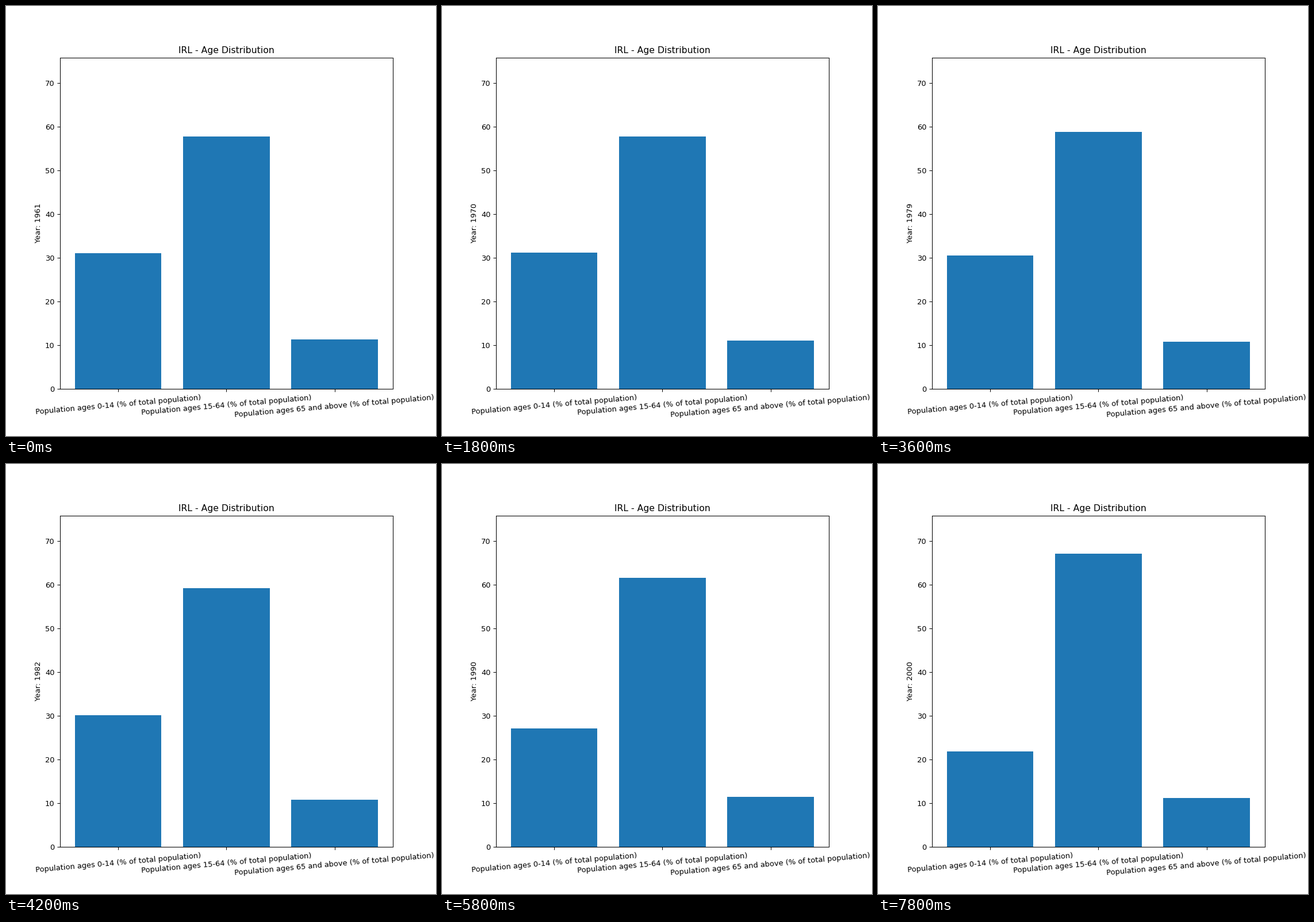
Recreate the animation shown at these times as a matplotlib script. Size 748 px wide and 748 px high, loop 8000 ms.

```python
import numpy as np
import matplotlib.pyplot as plt
from matplotlib.animation import FuncAnimation

SIZE, INCHES = 748, 8
FIRST, LAST = 1961, 2000
STEP_MS = 200
GROUPS = ["0-14", "15-64", "65 and above"]

# Turning points: year, share aged 15-64, share aged 65 and above
KEYS = [
    (1961, 57.76, 11.27),
    (1964, 58.00, 11.22),
    (1970, 57.76, 11.05),
    (1975, 58.20, 10.71),
    (1982, 59.16, 10.71),
    (1990, 61.53, 11.42),
    (1995, 64.34, 11.43),
    (2000, 67.06, 11.16),
]


def shares(year):
    """Shares drift evenly between turning points and add up to 100."""
    at, *columns = zip(*KEYS)
    working, older = (np.interp(year, at, c) for c in columns)
    return 100 - working - older, working, older


fig, ax = plt.subplots(figsize=(INCHES, INCHES), dpi=SIZE / INCHES)
labels = [f"Population ages {g} (% of total population)" for g in GROUPS]
bars = ax.bar(labels, shares(FIRST), color="#1f77b4")
ax.set_ylim(0, 75.8)
ax.set_title("IRL - Age Distribution")
ax.tick_params(axis="x", rotation=5)


def draw(i):
    year = FIRST + i
    for bar, share in zip(bars, shares(year)):
        bar.set_height(share)
    ax.set_ylabel(f"Year: {year}")
    return list(bars)


anim = FuncAnimation(fig, draw, frames=LAST - FIRST + 1, interval=STEP_MS,
                     repeat=True, repeat_delay=0, blit=False)
plt.show()
```
